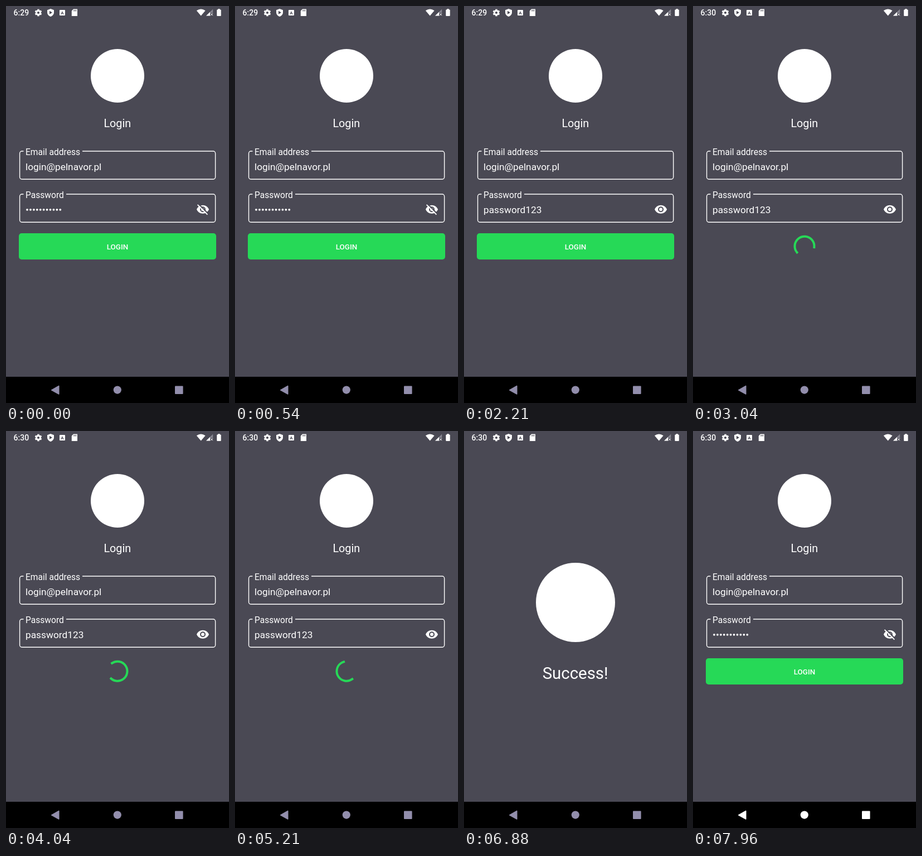
An HTML page with a canvas that plays this animation: 400 px wide and 711 px high, repeating every 8000 ms.

```html
<!DOCTYPE html>
<html lang="en">
<head>
<meta charset="utf-8">
<title>Login flow</title>
<style>
html, body { margin: 0; width: 100%; height: 100%; overflow: hidden; background: #4a4954; }
canvas { display: block; width: 400px; height: 711px; }
</style>
</head>
<body>
<canvas id="stage"></canvas>
<script>
const W = 400, H = 711, LOOP = 8000;
const BG = '#4a4954', WHITE = '#fff', GREEN = '#26d957';
const TIME = { reveal: 1400, submit: 2230, minute: 3000, slide: 6012, slideLen: 320, back: 7500, fade: 120 };

const canvas = document.getElementById('stage');
const ctx = canvas.getContext('2d');
const dpr = window.devicePixelRatio || 1;
canvas.width = W * dpr;
canvas.height = H * dpr;

const EYE = new Path2D('M12 4.5C7 4.5 2.7 7.6 1 12c1.7 4.4 6 7.5 11 7.5s9.3-3.1 11-7.5c-1.7-4.4-6-7.5-11-7.5z' +
  'M17 12a5 5 0 1 1-10 0a5 5 0 1 1 10 0zM15 12a3 3 0 1 1-6 0a3 3 0 1 1 6 0z');
const SHIELD = new Path2D('M80 5l6 2.2v4.4c0 3.4-2.5 6.2-6 7.4c-3.5-1.2-6-4-6-7.4V7.2z');

const clamp = x => Math.max(0, Math.min(1, x));
const mix = (a, b, k) => a + (b - a) * k;

function text(str, x, y, size, align = 'left', weight = 400, color = WHITE) {
  ctx.font = `${weight} ${size}px Roboto, sans-serif`;
  ctx.textAlign = align;
  ctx.fillStyle = color;
  ctx.fillText(str, x, y);
}

function rect(x, y, w, h, color, r = 0) {
  ctx.fillStyle = color;
  ctx.beginPath();
  ctx.roundRect(x, y, w, h, r);
  ctx.fill();
}

function disc(x, y, r, color = WHITE) {
  ctx.fillStyle = color;
  ctx.beginPath();
  ctx.arc(x, y, r, 0, Math.PI * 2);
  ctx.fill();
}

function poly(points, color = WHITE) {
  ctx.fillStyle = color;
  ctx.beginPath();
  points.forEach(([x, y]) => ctx.lineTo(x, y));
  ctx.closePath();
  ctx.fill();
}

function line(x1, y1, x2, y2, width, color) {
  ctx.strokeStyle = color;
  ctx.lineWidth = width;
  ctx.beginPath();
  ctx.moveTo(x1, y1);
  ctx.lineTo(x2, y2);
  ctx.stroke();
}

function field(label, y, gapEnd) {
  const l = 24.6, r = 375.6, b = y + 50.3, c = 4;
  ctx.strokeStyle = WHITE;
  ctx.lineWidth = 1.4;
  ctx.beginPath();
  ctx.moveTo(gapEnd, y);
  ctx.arcTo(r, y, r, b, c);
  ctx.arcTo(r, b, l, b, c);
  ctx.arcTo(l, b, l, y, c);
  ctx.arcTo(l, y, r, y, c);
  ctx.lineTo(31.5, y);
  ctx.stroke();
  text(label, 35, y + 6.7, 15.6);
}

function eye(x, y, hidden) {
  ctx.save();
  ctx.translate(x, y);
  ctx.fillStyle = WHITE;
  ctx.fill(EYE, 'evenodd');
  if (hidden) {
    line(3.9, 1.8, 21.6, 19.5, 2, BG);
    line(2.6, 3.6, 20.4, 21.4, 1.8, WHITE);
  }
  ctx.restore();
}

// y of a cubic ease from (0,0) to (1,1) with control points (x1,0) and (x2,1)
function ease(x, x1, x2) {
  let lo = 0, hi = 1;
  for (let i = 0; i < 24; i++) {
    const s = (lo + hi) / 2, q = 1 - s;
    if (3 * q * q * s * x1 + 3 * q * s * s * x2 + s * s * s < x) lo = s; else hi = s;
  }
  return lo * lo * (3 - 2 * lo);
}

function spinner(x, y, t) {
  const p = (t / 1333) % 1;
  const head = 0.75 * ease(clamp(p * 2), 0.4, 0.2);
  const tail = 0.75 * ease(clamp(p * 2 - 1), 0.4, 0.2);
  const base = -0.25 + 0.25 * p + t / 2222;
  ctx.strokeStyle = GREEN;
  ctx.lineWidth = 4;
  ctx.lineCap = 'square';
  ctx.beginPath();
  ctx.arc(x, y, 17.5, (base + tail) * 2 * Math.PI, (base + Math.max(head, tail + 0.002)) * 2 * Math.PI);
  ctx.stroke();
  ctx.lineCap = 'butt';
}

function loginScreen(shown, busy) {
  disc(200, 125, 48);
  text('Login', 199.8, 216.5, 19.8, 'center');
  field('Email address', 260, 137);
  text('login@pelnavor.pl', 35, 294, 17.3);
  field('Password', 337, 108);
  if (shown) text('password123', 35, 371, 17.3);
  else for (let i = 0; i < 11; i++) disc(38 + i * 5.93, 364.8, 1.9);
  eye(341, 352.3, !shown);
  if (busy >= 0) {
    spinner(200, 430.2, busy);
  } else {
    rect(23, 407, 354, 47, GREEN, 5);
    text('LOGIN', 200, 435.7, 13.4, 'center', 500);
  }
}

function successScreen() {
  disc(200, 307, 71);
  text('Success!', 199.6, 444, 29.4, 'center');
}

function gear(x, y) {
  for (let i = 0; i < 3; i++) {
    const a = Math.PI / 2 + i * Math.PI / 3, dx = Math.cos(a) * 6.3, dy = Math.sin(a) * 6.3;
    line(x - dx, y - dy, x + dx, y + dy, 3.4, WHITE);
  }
  disc(x, y, 4.9);
  disc(x, y, 2.1, BG);
}

function statusBar(t) {
  const late = t >= TIME.minute;
  text(late ? '6:30' : '6:29', 13.5, 17, 14, 'left', 500);
  gear(58, 12);
  ctx.fillStyle = WHITE;
  ctx.fill(SHIELD);
  poly([[78, 8.8], [78, 14.8], [83, 11.8]], BG);
  rect(96, 7, 10, 10, WHITE, 1);
  text('A', 101, 15, 8, 'center', 700, BG);
  poly([[121, 5.5], [128, 5.5], [128, 18], [117.8, 18], [117.8, 8.7]]);
  for (let i = 0; i < 3; i++) rect(121.3 + i * 2, 7, 1, 2.5, BG);

  ctx.fillStyle = WHITE;
  ctx.beginPath();
  ctx.moveTo(349.7, 17.5);
  ctx.lineTo(341.8, 8.2);
  ctx.quadraticCurveTo(349.7, 2.6, 357.6, 8.2);
  ctx.fill();
  poly([[371.2, 5.5], [371.2, 17.6], [359, 17.6]], '#85848f');
  poly([[366, 10.7], [366, 17.6], [359, 17.6]]);
  rect(366.3, 12.5, 5.5, 5.5, BG);
  line(367, 13.2, 371, 17.2, 1, WHITE);
  line(371, 13.2, 367, 17.2, 1, WHITE);
  rect(380.2, 5.2, 3.6, 2, WHITE);
  rect(378.2, 6.4, 7.5, 11.6, WHITE, 1);
}

function navBar(t) {
  const k = clamp((t - TIME.back + 100) / 200);
  const color = `rgb(${mix(146, 255, k)},${mix(142, 255, k)},${mix(172, 255, k)})`;
  rect(0, 664, W, H - 664, '#000');
  ctx.strokeStyle = color;
  ctx.lineJoin = 'round';
  ctx.lineWidth = 1.5;
  poly([[81.7, 687.8], [94.8, 680.5], [94.8, 695.1]], color);
  ctx.stroke();
  disc(199.8, 687.6, 7.1, color);
  rect(303, 680.6, 14.6, 14.4, color, 1);
}

function layer(draw, x, alpha = 1) {
  ctx.save();
  ctx.globalAlpha = alpha;
  ctx.translate(x, 0);
  draw();
  ctx.restore();
}

function render(t) {
  ctx.setTransform(dpr, 0, 0, dpr, 0, 0);
  rect(0, 0, W, H, BG);
  if (t < TIME.back) {
    const k = (1 - Math.cos(Math.PI * clamp((t - TIME.slide) / TIME.slideLen))) / 2;
    if (k < 1) layer(() => loginScreen(t >= TIME.reveal, t - TIME.submit), Math.round(-W * k));
    if (k > 0) layer(successScreen, Math.round(W * (1 - k)));
  } else {
    const k = clamp((t - TIME.back) / TIME.fade);
    if (k < 1) layer(successScreen, 0, 1 - k);
    layer(() => loginScreen(false, -1), 0, k);
  }
  statusBar(t);
  navBar(t);
}

const start = performance.now();
function tick() {
  render((performance.now() - start) % LOOP);
  requestAnimationFrame(tick);
}
tick();
</script>
</body>
</html>
```
